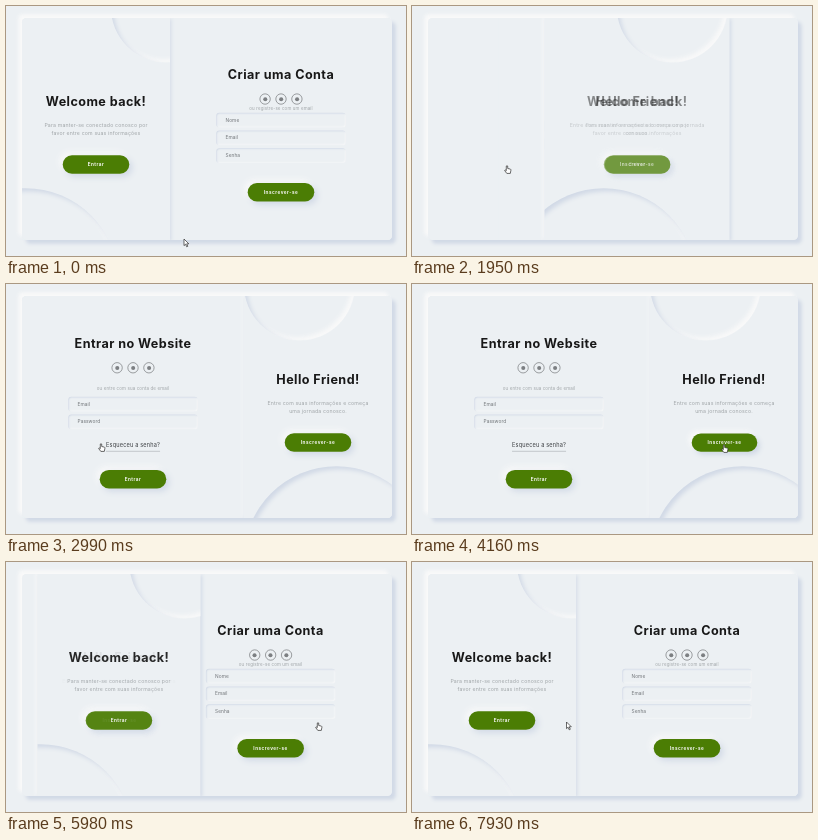
These frames come from a looping animation (400 px wide and 250 px high, 8 s). An HTML page:

```html
<!DOCTYPE html>
<html lang="pt">
<head>
<meta charset="utf-8">
<title>Conta</title>
<style>
  :root { --bg: #ecf0f3; --dark: #d1d9e6; --light: #f9f9f9; }
  html, body { margin: 0; width: 100%; height: 100%; overflow: hidden; background: var(--bg); }
  body { position: relative; font-family: Inter, "Open Sans", sans-serif; }
  #card {
    position: absolute; left: 16px; top: 12px; width: 1000px; height: 600px;
    transform: scale(.37); transform-origin: 0 0; overflow: hidden;
    background: var(--bg); border-radius: 12px;
    box-shadow: 10px 10px 10px var(--dark), -10px -10px 10px var(--light);
  }
  .form { position: absolute; top: 0; width: 600px; height: 600px; background: var(--bg); }
  #side {
    position: absolute; top: 0; height: 600px; z-index: 300; overflow: hidden; background: var(--bg);
    box-shadow: 4px 4px 10px var(--dark), -4px -4px 10px var(--light);
  }
  .disc {
    position: absolute; border-radius: 50%; background: var(--bg);
    box-shadow: inset 8px 8px 12px var(--dark), inset -8px -8px 12px var(--light);
  }
  #big { width: 500px; height: 500px; top: 460px; }
  #small { width: 300px; height: 300px; top: -180px; }
  .panel { position: absolute; inset: 0; }
  .mid {
    position: absolute; left: 50%; top: var(--y);
    transform: translate(-50%, -50%); white-space: nowrap;
  }
  .title { font-weight: 700; font-size: 34px; letter-spacing: 1.2px; line-height: 1; color: #181818; }
  .text { font-size: 14px; letter-spacing: .45px; line-height: 23px; text-align: center; color: #a0a5a8; }
  .note { font-size: 12px; letter-spacing: .35px; color: #a0a5a8; }
  .link {
    font-size: 15px; letter-spacing: .5px; line-height: 31px; color: #3a3d40;
    border-bottom: 2px solid #b4b9bd;
  }
  .field {
    width: 350px; height: 40px; box-sizing: border-box; padding-left: 25px;
    font-size: 13px; letter-spacing: .15px; line-height: 39px; color: #707478;
    border-radius: 8px; background: var(--bg);
    box-shadow: inset 2px 2px 4px var(--dark), inset -2px -2px 4px var(--light);
  }
  .button {
    width: 180px; height: 50px; border-radius: 25px; background: #4b7d04; color: #f9f9f9;
    font-weight: 700; font-size: 12.5px; letter-spacing: 1.3px; line-height: 50px; text-align: center;
    box-shadow: 8px 8px 16px var(--dark), -8px -8px 16px var(--light);
  }
  .icons { display: flex; gap: 13px; }
  .icons i {
    display: grid; place-items: center; width: 30px; height: 30px; box-sizing: border-box;
    border: 2.5px solid #7c7f82; border-radius: 50%;
  }
  .icons i::after { content: ""; width: 11px; height: 11px; border-radius: 50%; background: #7c7f82; }
  #cursor { position: absolute; left: 0; top: 0; width: 12px; height: 12px; overflow: visible; }
  #cursor path { fill: #fff; stroke: #2b2b2b; stroke-width: .7; stroke-linejoin: round; }
</style>
</head>
<body>
<div id="card">
  <div class="form" id="signUp">
    <div class="mid title" style="--y:154px">Criar uma Conta</div>
    <div class="mid icons" style="--y:219px"><i></i><i></i><i></i></div>
    <div class="mid note" style="--y:244px">ou registre-se com um email</div>
    <div class="mid field" style="--y:276px">Nome</div>
    <div class="mid field" style="--y:324px">Email</div>
    <div class="mid field" style="--y:372px">Senha</div>
    <div class="mid button" style="--y:471px">Inscrever-se</div>
  </div>
  <div class="form" id="signIn">
    <div class="mid title" style="--y:128px">Entrar no Website</div>
    <div class="mid icons" style="--y:194px"><i></i><i></i><i></i></div>
    <div class="mid note" style="--y:249px">ou entre com sua conta de email</div>
    <div class="mid field" style="--y:292px">Email</div>
    <div class="mid field" style="--y:340px">Password</div>
    <div class="mid link" style="--y:404px">Esqueceu a senha?</div>
    <div class="mid button" style="--y:495px">Entrar</div>
  </div>
  <div id="side">
    <div class="disc" id="big"></div>
    <div class="disc" id="small"></div>
    <div class="panel" id="welcome">
      <div class="mid title" style="--y:227px">Welcome back!</div>
      <div class="mid text" style="--y:300px">Para manter-se conectado conosco por<br>favor entre com suas informações</div>
      <div class="mid button" id="enter" style="--y:396px">Entrar</div>
    </div>
    <div class="panel" id="hello">
      <div class="mid title" id="helloTitle">Hello Friend!</div>
      <div class="mid text" id="helloText" style="--y:300px;white-space:pre"></div>
      <div class="mid button" id="join">Inscrever-se</div>
    </div>
  </div>
</div>
<svg id="cursor">
  <path id="arrow" d="M0 0V6.6L1.6 5.2L2.7 7.8L3.8 7.3L2.7 4.8H4.8Z"/>
  <path id="hand" d="M-.7 0Q0 -.8 .7 0V2.5L3.4 3.1Q4 3.4 3.9 4.3L3.3 7.4H-.2L-2.3 4.6Q-2.2 3.7 -1.5 4L-.7 4.7Z"/>
</svg>
<script>
  const LOOP = 8000, STEP = 130, SPAN = 1316;
  const TO_SIGN_IN = 1547, TO_SIGN_UP = 5091;
  const $ = id => document.getElementById(id);
  const clamp = x => Math.min(1, Math.max(0, x));
  const mix = (a, b, k) => a + (b - a) * k;
  const smooth = k => k * k * (3 - 2 * k);

  // The CSS "ease" curve
  function ease(x) {
    if (x <= 0 || x >= 1) return clamp(x);
    const bez = (u, a, b) => 3 * (1 - u) * (1 - u) * u * a + 3 * (1 - u) * u * u * b + u * u * u;
    let lo = 0, hi = 1;
    for (let i = 0; i < 24; i++) {
      const u = (lo + hi) / 2;
      if (bez(u, .25, .25) < x) lo = u; else hi = u;
    }
    return bez(lo, .1, 1);
  }

  function sideWidth(k) {
    const stretch = k < .5 ? ease(clamp((k - .1) / .2)) : 1 - ease((k - .5) / .5);
    return 400 + 100 * stretch;
  }

  function helloLines(room) {
    const words = "Entre com suas informações e começa|uma|jornada|conosco.".split("|");
    const fit = room >= 440 ? 4 : room >= 388 ? 3 : room >= 319 ? 2 : 1;
    return [words.slice(0, fit).join(" "), words.slice(fit).join(" ")].filter(Boolean);
  }

  function placeCursor(t) {
    const moves = [
      [0, 520, 178, 233, 95, 160],
      [3120, 4160, 95, 160, 312, 161],
      [7150, 7930, 312, 161, 154.5, 160]
    ];
    const [from, to, x0, y0, x1, y1] = moves.filter(m => t >= m[0]).pop();
    const k = smooth(clamp((t - from) / (to - from)));
    const x = mix(x0, x1, k), y = mix(y0, y1, k);
    const overEnter = t >= 390 && t <= 3120 && y < 168;
    const overJoin = t > 3120 && t <= 7150 && x > 279;
    const hand = overEnter || overJoin;
    $("cursor").style.transform = `translate(${x}px, ${y}px)`;
    $("hand").style.display = hand ? "" : "none";
    $("arrow").style.display = hand ? "none" : "";
    $("enter").style.scale = overEnter ? .985 : 1;
    $("join").style.scale = overJoin ? .985 : 1;
  }

  function draw(t) {
    const back = t >= TO_SIGN_UP;
    const k = clamp((t - (back ? TO_SIGN_UP : TO_SIGN_IN)) / SPAN);
    const p = back ? 1 - ease(k) : ease(k);
    const width = sideWidth(k);

    $("side").style.left = 600 * p + "px";
    $("side").style.width = width + "px";
    $("big").style.left = mix(-.6 * width, width - 400, p) + "px";
    $("small").style.left = mix(.6 * width, width - 400, p) + "px";

    for (const id of ["signUp", "signIn"]) $(id).style.left = 400 * (1 - p) + "px";
    $("signUp").style.zIndex = 100;
    $("signIn").style.zIndex = Math.round(200 * p);

    $("welcome").style.opacity = 1 - p;
    $("hello").style.opacity = p;
    const lines = helloLines(width - (back ? 54 : 84));
    const shift = lines.length === 1 ? 11.5 : 0;
    $("helloText").textContent = lines.join("\n");
    $("helloTitle").style.setProperty("--y", 227 + shift + "px");
    $("join").style.setProperty("--y", 396 - shift + "px");

    placeCursor(t);
  }

  const start = performance.now();
  function tick() {
    const t = (performance.now() - start) % LOOP;
    draw(Math.floor(t / STEP) * STEP);
    requestAnimationFrame(tick);
  }
  tick();
</script>
</body>
</html>
```
